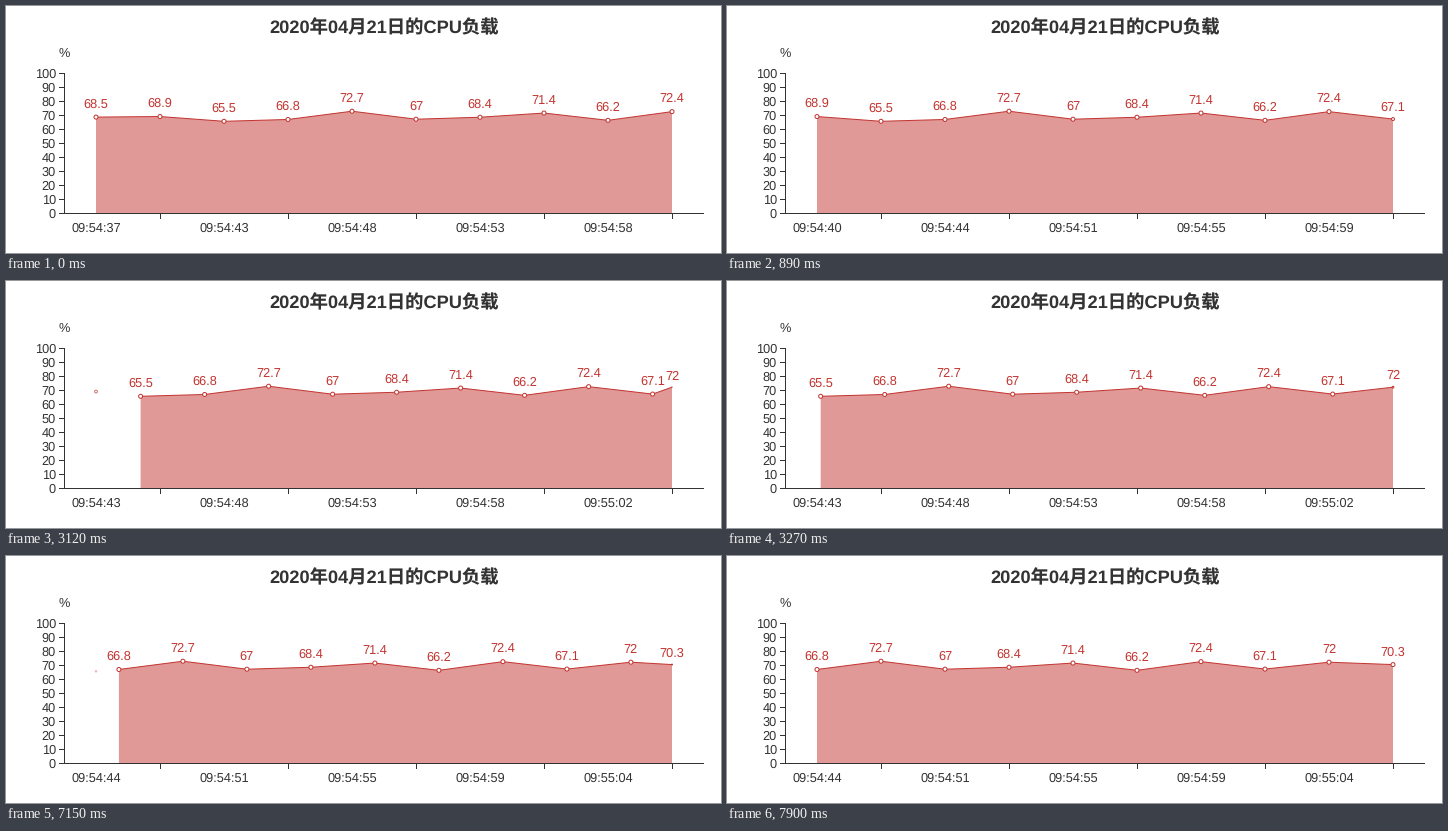
Animation of 715 by 247 pixels, one loop 8000 ms. Source, as a matplotlib script:

```python
import matplotlib.pyplot as plt
from matplotlib.animation import FuncAnimation
from matplotlib.patches import Circle, Polygon, Rectangle

W, H, DPI = 715, 247, 64
PT = 72 / DPI  # points per pixel
LOOP, STEP = 8000, 20
RED, DARK = "#c23531", "#333333"
LEFT, BASE, BAND, UNIT = 90, 207, 64, 1.4
SLOTS = 10

LOADS = [68.5, 68.9, 65.5, 66.8, 72.7, 67, 68.4, 71.4, 66.2, 72.4, 67.1, 72, 70.3]
CLOCK = ["54:37", "54:40", "54:43", "54:44", "54:48", "54:51",
         "54:53", "54:55", "54:58", "54:59", "55:02", "55:04"]

# Start of each data update, and the moments at which the chart repaints
STARTS = [-2000, 533, 3086, 7063]
REPAINTS = [0, 600, 740, 890, 1030, 1180, 1330, 1470, 1620,
            3120, 3270, 3420, 3570, 3710, 3860, 4000, 4150,
            7150, 7300, 7450, 7600, 7750, 7900]

plt.rcParams["font.family"] = ["Liberation Sans", "Noto Sans CJK JP"]
plt.rcParams["text.hinting"] = "none"

fig = plt.figure(figsize=(W / DPI, H / DPI), dpi=DPI, facecolor="white")
ax = fig.add_axes([0, 0, 1, 1])
ax.set_xlim(0, W)
ax.set_ylim(H, 0)
ax.axis("off")


def label(x, y, text="", size=12.8, color=DARK, ha="center", **kw):
    return ax.text(x, y, text, fontsize=size * PT, color=color, ha=ha,
                   va="baseline", zorder=5, **kw)


def bar(x, y, w, h):
    ax.add_patch(Rectangle((x, y), w, h, color=DARK, lw=0, zorder=1))


def dot():
    return ax.add_patch(Circle((0, 0), 2, fc="white", ec=RED, lw=PT, zorder=4))


def cubic_out(u):
    return 1 - (1 - min(max(u, 0), 1)) ** 3


def height(load):
    return BASE - load * UNIT


# Fixed parts
label(378.5, 27, "2020年04月21日的CPU负载", size=18.3, weight="bold")
label(58, 51, "%")
bar(58, 67, 1, 141)
bar(58, BASE, 640, 1)
for i in range(11):
    y = BASE - 14 * i
    bar(53, y, 5, 1)
    label(50, y + 5, str(10 * i), ha="right")
for i in range(5):
    bar(LEFT + BAND + 2 * BAND * i, BASE, 1, 6)

# Moving parts
times = [label(LEFT + 2 * BAND * i, 226) for i in range(5)]
area = ax.add_patch(Polygon([(0, 0), (1, 0), (1, 1)], fc=RED, alpha=0.5, lw=0, zorder=2))
line, = ax.plot([], [], color=RED, lw=PT, solid_joinstyle="bevel",
                solid_capstyle="butt", zorder=3)
dots = [dot() for _ in range(SLOTS)]
ghost = dot()
values = [label(0, 0, color=RED) for _ in range(SLOTS)]


def draw(frame):
    t = frame * STEP + STEP / 2
    now = max(r for r in REPAINTS if r <= t)
    first = sum(s <= now for s in STARTS) - 1
    passed = now - STARTS[first]
    slide = cubic_out(passed / 300)
    grow = cubic_out(passed / 1000)

    loads = LOADS[first:first + SLOTS]
    xs = [LEFT + BAND * (j + 1 - slide) for j in range(SLOTS - 1)]
    xs.append(LEFT + BAND * (SLOTS - 1))
    ys = [height(v) for v in loads]

    line.set_data(xs, ys)
    area.set_xy([(xs[0], BASE), *zip(xs, ys), (xs[-1], BASE)])
    for j, (x, y, v) in enumerate(zip(xs, ys, loads)):
        scale = grow if j == SLOTS - 1 else 1
        dots[j].center = x, y
        dots[j].set_radius(2 * scale)
        values[j].set_position((x, y - 9.2 + 2 * (1 - scale)))
        values[j].set_text(f"{v:g}")

    # The point that dropped out shrinks and fades where it stood
    ghost.set_visible(slide < 1)
    ghost.center = LEFT, height(LOADS[max(first - 1, 0)])
    ghost.set_radius(2 * (1 - slide))
    ghost.set_alpha(1 - slide)

    for i, text in enumerate(times):
        text.set_text("09:" + CLOCK[first + 2 * i])
    return [area, line, ghost, *dots, *values, *times]


anim = FuncAnimation(fig, draw, frames=LOOP // STEP, interval=STEP,
                     init_func=lambda: draw(0), repeat=True, repeat_delay=0)
plt.show()
```
